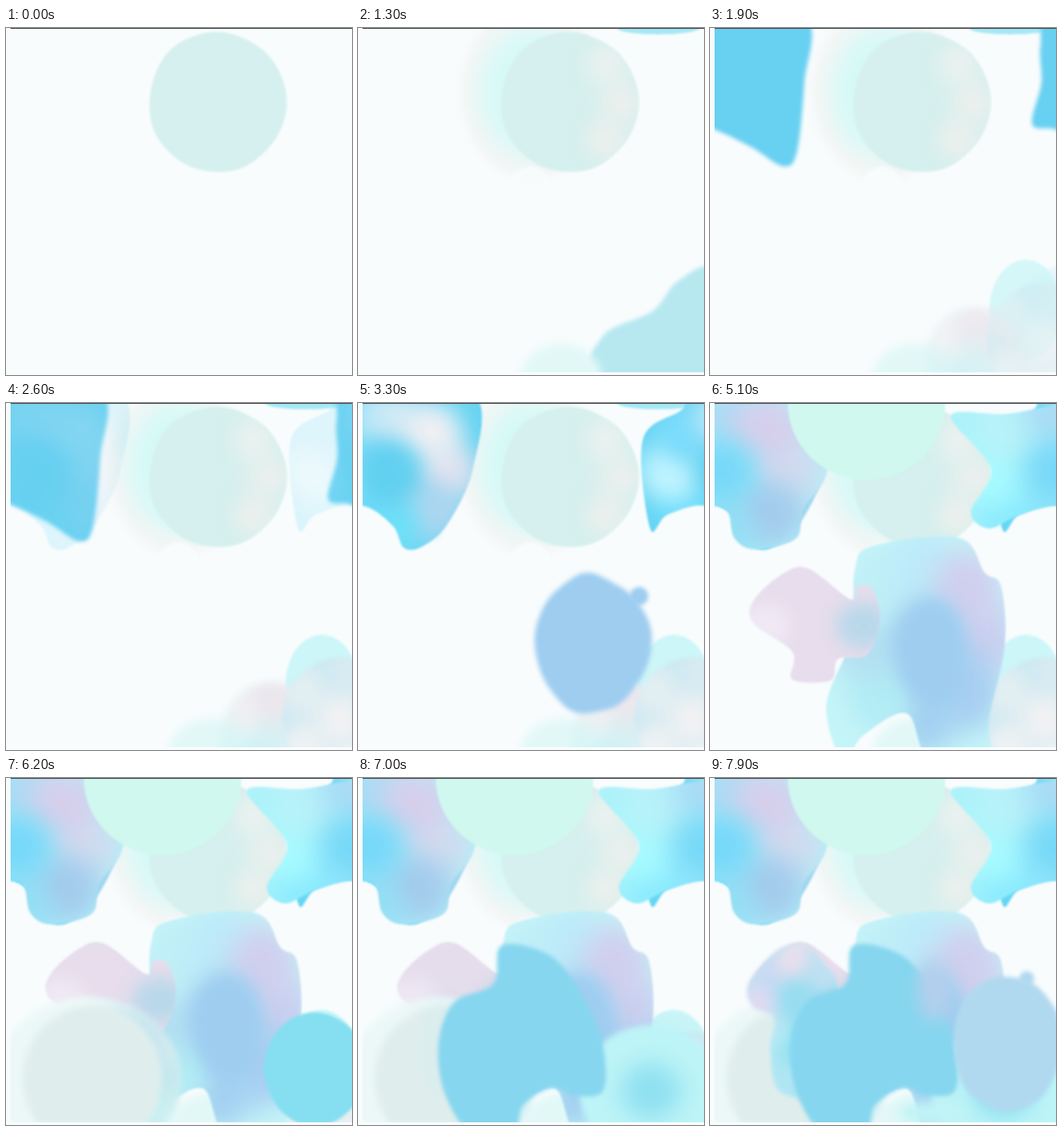
Recreate the animation shown at these times as an HTML page. Size 378 by 379 pixels, loop 8 s.

```html
<!DOCTYPE html>
<html lang="en">
<head>
<meta charset="utf-8">
<title>Watercolour drops</title>
<style>
  html, body { margin: 0; width: 100%; height: 100%; overflow: hidden; background: #f8fcfd; }
  svg { display: block; width: 100vw; height: 100vh; }
</style>
</head>
<body>
<svg id="stage" viewBox="0 0 378 379" preserveAspectRatio="none">
  <defs><clipPath id="paper"><rect x="5" y="1" width="373" height="375"/></clipPath></defs>
  <g id="paint" clip-path="url(#paper)"></g>
  <rect x="5" y="0" width="373" height="1" fill="#50565a"/>
</svg>
<script>
const LOOP = 8000, STEP = 100, SHEET_WIDTH = 373, PAPER = '#f8fcfd';
const paint = document.getElementById('paint');
const defs = document.querySelector('defs');
const layers = [];
let clipCount = 0;

function add(parent, tag, attrs = {}) {
  const node = document.createElementNS('http://www.w3.org/2000/svg', tag);
  for (const key in attrs) node.setAttribute(key, attrs[key]);
  return parent.appendChild(node);
}

function blur(node, amount) {
  if (amount) node.style.filter = `blur(${amount}px)`;
  return node;
}

function random(seed) {
  return () => (seed = seed * 16807 % 2147483647) / 2147483647;
}

function smooth(points) {
  const n = points.length;
  const at = i => points[(i + n) % n];
  let d = 'M' + points[0];
  points.forEach((p, i) => {
    const next = at(i + 1);
    const a = p.map((v, k) => v + (next[k] - at(i - 1)[k]) / 6);
    const b = next.map((v, k) => v - (at(i + 2)[k] - p[k]) / 6);
    d += `C${a} ${b} ${next}`;
  });
  return d + 'Z';
}

// A blot: an ellipse whose radius wavers by a few seeded harmonics.
function blot({ x, y, rx, ry = rx, rough = 0 }) {
  const next = random(Math.round(x * 131 + y * 17 + 7));
  const waves = [3, 4, 5, 7, 9].map(n => ({ n, phase: next() * 2 * Math.PI }));
  return smooth(Array.from({ length: 32 }, (_, i) => {
    const a = i * Math.PI / 16;
    const k = 1 + rough * waves.reduce((sum, w) => sum + Math.sin(w.n * a + w.phase) / w.n, 0);
    return [x + rx * k * Math.cos(a), y + ry * k * Math.sin(a)];
  }));
}

const pairs = list => list.flatMap((v, i) => i % 2 ? [] : [[v, list[i + 1]]]);
const shape = spec => spec.edge ? smooth(pairs(spec.edge)) : blot(spec);

// Paint that lands at once; it may dry away from `gone` on.
function drop(spec) {
  const { at, color, soft = 1.2, gone = Infinity, rise = STEP } = spec;
  for (const dx of spec.wrap ? [0, SHEET_WIDTH] : [0]) {
    const node = add(paint, 'path', { d: shape(spec), fill: color, transform: `translate(${dx})` });
    layers.push({ node: blur(node, soft), at, rise, gone });
  }
}

// Paint that creeps outward: a base, a heart, and tints spaced evenly clockwise from the right.
function spread(spec) {
  const { at, x, y, rx, ry = rx, base, heart, ring = [], size = .42, soft = 1.2 } = spec;
  const id = 'edge' + clipCount++, d = shape(spec);
  add(add(defs, 'clipPath', { id }), 'path', { d });
  for (const dx of spec.wrap ? [0, SHEET_WIDTH] : [0]) {
    const node = blur(add(paint, 'g', { transform: `translate(${dx})` }), soft);
    const wet = add(node, 'g', { 'clip-path': `url(#${id})` });
    if (base) add(wet, 'path', { d, fill: base });
    const tint = (fill, cx, cy, k) => blur(
      add(wet, 'ellipse', { cx, cy, rx: rx * k, ry: ry * k, fill }), Math.min(rx, ry) * .16);
    ring.forEach((fill, i) => {
      const a = i * 2 * Math.PI / ring.length;
      if (fill) tint(fill, x + .75 * rx * Math.cos(a), y + .75 * ry * Math.sin(a), size);
    });
    if (heart) tint(heart, x, y, size);
    layers.push({ node, at, rise: 700, gone: Infinity });
  }
}

// Upper middle
const first = { x: 231, y: 81, rx: 75, ry: 76.5, rough: .02 };
spread({ at: 800, x: 190, y: 70, rx: 78, ry: 96, base: '#f6f6f5', heart: '#d5f9f7', size: .76, soft: 4 });
drop({ at: 900, x: 188, y: 174, rx: 22, color: PAPER, soft: 2, rise: 600 });
drop({ at: 0, ...first, color: '#d5f0ee' });
spread({ at: 200, ...first, size: .27, ring: ['#efefed', '#efefec', '', '', '', '', '', '#eef1ef'] });

// Lower right
drop({ at: 600, edge: [390, 268, 350, 276, 322, 309, 268, 336, 256, 390, 390, 390], color: '#b7e8f0', soft: 2, gone: 1500 });
drop({ at: 700, x: 328, y: 0, rx: 45, ry: 7, color: '#a5e8f5', gone: 3600 });
drop({ at: 900, x: 222, y: 385, rx: 45, ry: 40, color: '#e2f8f7', soft: 4, rise: 400 });
spread({ at: 1500, x: 345, y: 308, rx: 40, ry: 55, base: '#cdf6f8' });
spread({ at: 1500, x: 290, y: 365, rx: 55, ry: 60, base: '#d8f1f4', ring: ['', '', '', '#bdf0f5', '#d8f5f6', '#f0f0f2', '#ece6ed', '#ece8ee'], soft: 4 });
spread({ at: 1600, x: 365, y: 346, rx: 63, ry: 68, base: '#c9e9f2', heart: '#f0f1f3', ring: ['#f2f2f3', '#f2f2f3', '#eef1f4', '#e2eef2', '#d8ebf2'], soft: 2 });

// Top left, continuing across the right-hand edge
drop({ at: 1700, edge: [104, -10, 103, 60, 95, 135, 80, 151, 45, 130, 5, 111, -21, 105, -11, 60, -12, 20, 2, -10], color: '#68d0f1', soft: 2, gone: 2800, wrap: true });
spread({
  at: 2500, x: 33, y: 75, rx: 85, ry: 80, wrap: true, base: '#66d4f2', heart: '#62d0f0',
  edge: [125, -10, 126, 70, 98, 132, 70, 157, 50, 158, 38, 134, 5, 112, -35, 122, -54, 137, -62, 40, -20, 8, 0, -10],
  ring: ['#dfe2f0', '#b0d6f0', '#6fe0f8', '#6cdcfc', '#c2f4ff', '#7cdcfb', '#c8e9f6', '#efeff3']
});
spread({
  at: 3500, x: 10, y: 75, rx: 100, ry: 88, wrap: true, base: '#aef3fa', heart: '#78d8f8',
  edge: [130, -10, 128, 75, 102, 115, 94, 148, 50, 160, 27, 148, 20, 120, 5, 112, -35, 122, -68, 137, -88, 119, -66, 72, -110, 14, -50, 12, 2, 4],
  ring: ['#d0ddf0', '#a5cbec', '#95def4', '#8beafd', '#a6faff', '#b8f2f9', '#aadcf5', '#d6cfec']
});

// Centre
const blue = '#9ecdf0';
drop({ at: 3000, x: 256, y: 263, rx: 63, ry: 75, rough: .06, color: blue, soft: 2.5, gone: 4300 });
drop({ at: 3000, x: 307, y: 211, rx: 10, color: blue, soft: 2, gone: 4000 });
spread({
  at: 3600, x: 234, y: 260, rx: 88, ry: 105, base: '#c5f5f8', heart: blue,
  edge: [158, 183, 178, 156, 272, 147, 300, 185, 318, 200, 322, 265, 305, 345, 303, 390, 240, 390, 215, 339, 168, 363, 145, 390, 127, 330, 155, 255],
  ring: ['#c9d0f0', '#a9cff1', '#a3d0f1', '#b2ecf5', '#b4e0f1', '#c0eff7', '#bdeaf9', '#d0cfee']
});
drop({ at: 3800, x: 243, y: 273, rx: 38, ry: 58, color: blue, soft: 9, rise: 600 });

// Pale lilac on the left
spread({
  at: 4000, x: 114, y: 243, rx: 72, ry: 60, base: '#e7ddec',
  edge: [48, 215, 80, 186, 108, 181, 153, 214, 160, 201, 176, 202, 186, 235, 172, 275, 140, 280, 132, 303, 90, 302, 90, 272, 47, 240],
  ring: ['#b8d8ea', '', '', '', '#f0e8f4', '', '', '']
});

// Mint on the top edge
drop({ at: 4500, x: 171, y: 0, rx: 86, ry: 84, color: '#d0f8ee' });

// Pale green at lower left
spread({ at: 5500, x: 90, y: 330, rx: 102, ry: 91, base: '#ecf8f7', ring: ['#c5e9ee', '#c8eff0', '', '', '', '', '', '#c8e5ee'], soft: 3 });
drop({ at: 5500, x: 94, y: 328, rx: 76, ry: 79, color: '#dfeeed', soft: 3 });

// Cyan at lower right
drop({ at: 6000, x: 338, y: 318, rx: 56, ry: 62, rough: .02, color: '#85dff0', soft: 1.5, gone: 6500 });
spread({ at: 6400, x: 320, y: 342, rx: 78, ry: 72, base: '#bdf4f7', heart: '#8fe0f1', soft: 3 });

// Sky blue in the middle, bleeding to both sides
const sky = '#86d6ef';
spread({
  at: 7000, x: 95, y: 243, rx: 52, ry: 58, base: '#b0e6f3', heart: '#98dcf0',
  edge: [42, 225, 75, 187, 105, 183, 124, 202, 140, 230, 150, 340, 80, 345, 66, 300, 70, 262, 47, 250],
  ring: [sky, sky, '#86e2f0', '#b8e8f4', '#e0daf1', '#c8daf3', '#eadfed', '#c0e0f1'], soft: 2
});
drop({ at: 6700, edge: [157, 183, 210, 194, 245, 238, 267, 290, 268, 341, 238, 347, 212, 338, 180, 358, 170, 390, 125, 390, 95, 345, 88, 290, 105, 245, 148, 225], color: sky, soft: 2 });
drop({ at: 7100, x: 245, y: 232, rx: 18, ry: 34, color: '#b4cfec', soft: 9, rise: 500 });
drop({ at: 7100, x: 245, y: 366, rx: 38, ry: 13, color: '#c0f3f5', soft: 6, rise: 500 });

// Soft blue on the right
drop({ at: 7500, x: 325, y: 290, rx: 60, ry: 74, rough: .03, color: '#b0d9f0', soft: 2 });
drop({ at: 7500, x: 346, y: 219, rx: 8, color: '#b0d9f0', soft: 2 });

const ease = x => { const u = Math.min(1, Math.max(0, x)); return u * u * (3 - 2 * u); };

function draw(time) {
  for (const { node, at, rise, gone } of layers) {
    const shown = ease((time - at + STEP) / rise) * (1 - ease((time - gone) / 600));
    node.setAttribute('opacity', time < at ? 0 : shown.toFixed(3));
  }
}

const begin = performance.now();
let last = -1;
function tick() {
  const time = Math.floor(((performance.now() - begin) % LOOP) / STEP) * STEP;
  if (time !== last) draw(last = time);
  requestAnimationFrame(tick);
}
draw(0);
requestAnimationFrame(tick);
</script>
</body>
</html>
```
